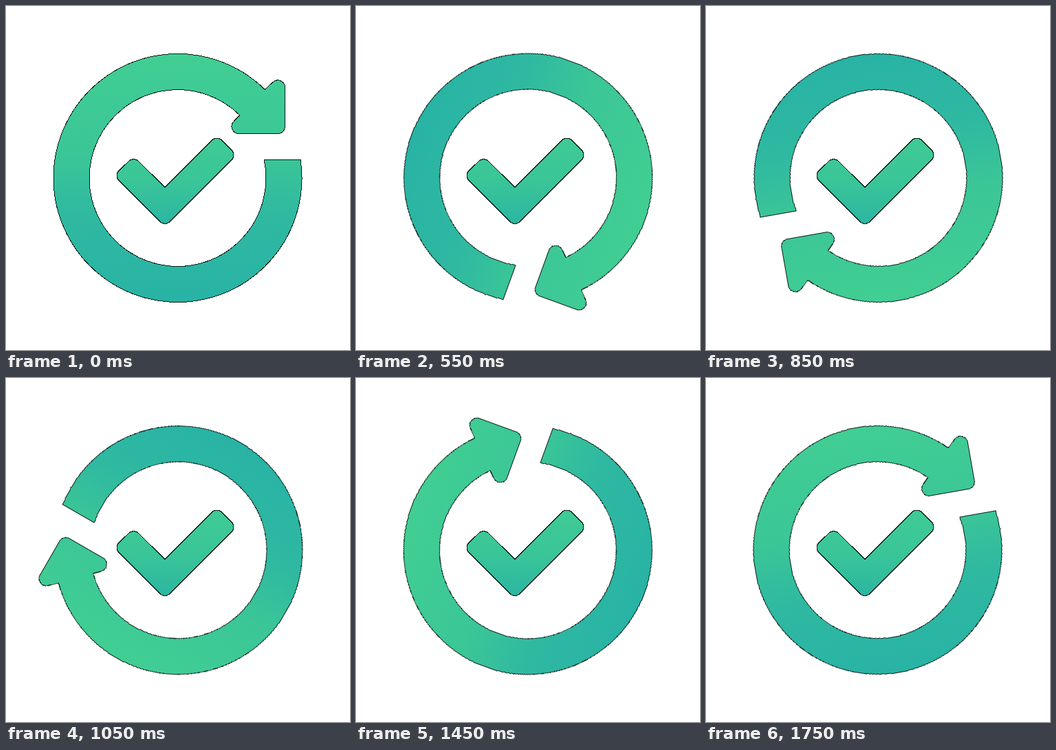
Recreate the animation shown at these times as an HTML page. Size 500x500 px, loop 1800 ms.

```html
<!DOCTYPE html>
<html lang="en">
<head>
<meta charset="utf-8">
<title>Check with turning arrow</title>
<style>
  html, body { margin: 0; width: 100%; height: 100%; overflow: hidden; background: #fff; }
  svg { display: block; width: 100vw; height: 100vh; }
  path { stroke: #0c1a15; stroke-width: 1; shape-rendering: crispEdges; }
  #arrow { transform-origin: 250px 250px; }
</style>
</head>
<body>
<svg viewBox="0 0 500 500">
  <defs>
    <linearGradient id="ringFill" gradientUnits="userSpaceOnUse" x1="0" y1="69" x2="0" y2="431">
      <stop offset="0" stop-color="#41ce93"/>
      <stop offset=".4" stop-color="#3bc697"/>
      <stop offset=".65" stop-color="#2fb9a1"/>
      <stop offset="1" stop-color="#28b3a5"/>
    </linearGradient>
    <linearGradient id="checkFill" gradientUnits="userSpaceOnUse" x1="0" y1="192" x2="0" y2="317">
      <stop offset="0" stop-color="#3fcb94"/>
      <stop offset=".5" stop-color="#3ac598"/>
      <stop offset="1" stop-color="#2bb6a2"/>
    </linearGradient>
  </defs>
  <g id="arrow">
    <!-- The ring sits slightly left of the pivot. -->
    <path transform="translate(-.5 0)" fill="url(#ringFill)" d="M376.7 121.4A180.5 180.5 0 1 0 428.5 223H375.5
      A128.4 128.4 0 1 1 340.3 158.8L331.6 167.6A10.5 10.5 0 0 0 339 185.5H396
      A10 10 0 0 0 406 175.5V118.5A10.5 10.5 0 0 0 388 111.1Z"/>
  </g>
  <path fill="url(#checkFill)" d="M231 263.5L299.2 195.2A10.3 10.3 0 0 1 313.8 195.2
    L327.8 209.2A10.3 10.3 0 0 1 327.8 223.8L238.3 313.3A10.3 10.3 0 0 1 223.7 313.3
    L164.2 253.8A10.3 10.3 0 0 1 164.2 239.2L178.2 225.7A10.3 10.3 0 0 1 192.8 225.7Z"/>
</svg>
<script>
  // One full turn in 36 hard steps of 10 degrees.
  document.getElementById('arrow').animate(
    { transform: ['rotate(0deg)', 'rotate(360deg)'] },
    { duration: 1800, iterations: Infinity, easing: 'steps(36, end)' }
  );
</script>
</body>
</html>
```
